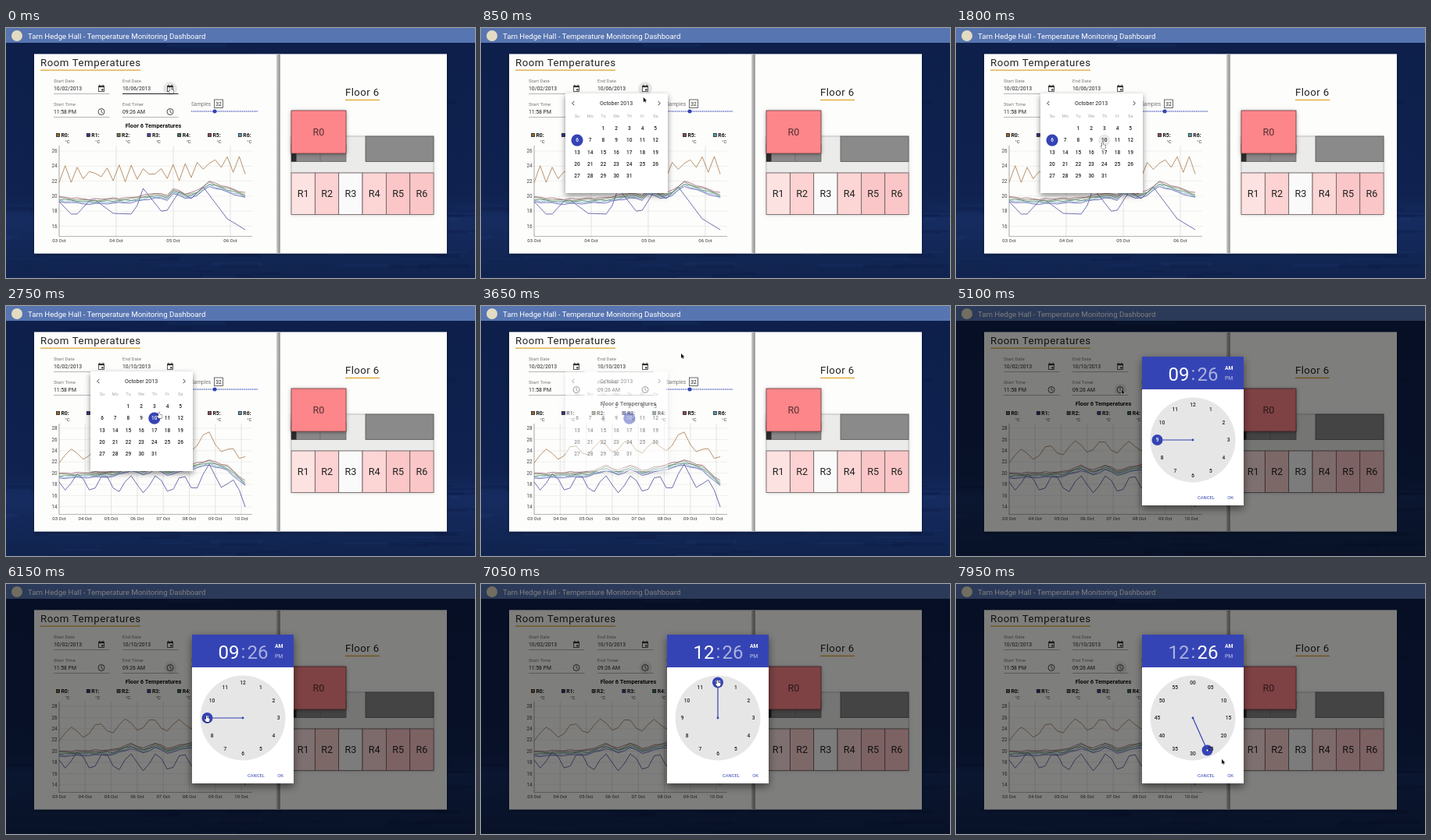
An HTML page with a canvas for the animation above (8000 ms loop, 600 px wide and 321 px high).

```html
<!DOCTYPE html>
<html lang="en">
<head>
<meta charset="utf-8">
<title>Temperature dashboard</title>
<style>
html, body { margin: 0; width: 100%; height: 100%; overflow: hidden; background: #0f2150; }
canvas { display: block; width: 100vw; height: 100vh; }
</style>
</head>
<body>
<canvas id="stage"></canvas>
<script>
const W = 600, H = 321, LOOP = 8000;
const canvas = document.getElementById('stage');
const ctx = canvas.getContext('2d');
const FONT = 'Roboto, "Open Sans", sans-serif';
const BLUE = '#3544b4', GOLD = '#e0aa3a', INK = '#222';

const clamp = v => Math.max(0, Math.min(1, v));
const ramp = (t, a, b) => clamp((t - a) / (b - a));
const ease = v => v * v * (3 - 2 * v);
const mix = (a, b, k) => a + (b - a) * k;

function text(s, x, y, size, color = INK, o = {}) {
  ctx.font = `${o.weight || 400} ${size}px ${FONT}`;
  ctx.letterSpacing = (o.space || 0) + 'px';
  ctx.textAlign = o.align || 'left';
  ctx.textBaseline = o.base || 'alphabetic';
  ctx.fillStyle = color;
  ctx.fillText(s, x, y);
  ctx.letterSpacing = '0px';
}
const centered = (s, x, y, size, color, weight) =>
  text(s, x, y, size, color, { align: 'center', base: 'middle', weight });

function box(x, y, w, h, fill, stroke) {
  ctx.fillStyle = fill;
  ctx.fillRect(x, y, w, h);
  if (stroke) {
    ctx.strokeStyle = stroke;
    ctx.lineWidth = 0.8;
    ctx.strokeRect(x, y, w, h);
  }
}

function line(pts, color, width = 1) {
  ctx.beginPath();
  pts.forEach(([x, y]) => ctx.lineTo(x, y));
  ctx.strokeStyle = color;
  ctx.lineWidth = width;
  ctx.stroke();
}

function disc(x, y, r, fill) {
  ctx.beginPath();
  ctx.arc(x, y, r, 0, 7);
  ctx.fillStyle = fill;
  ctx.fill();
}

// A raised box; the shadow stays outside so the box can fade cleanly.
function card(x, y, w, h, fill, blur, dy, alpha) {
  const k = canvas.width / W;
  ctx.save();
  ctx.beginPath();
  ctx.rect(0, 0, W, H);
  ctx.rect(x, y, w, h);
  ctx.clip('evenodd');
  ctx.shadowColor = `rgba(0,0,0,${alpha})`;
  ctx.shadowBlur = blur * k;
  ctx.shadowOffsetY = dy * k;
  box(x, y, w, h, fill);
  ctx.restore();
  box(x, y, w, h, fill);
}

function random(seed) {
  return () => (seed = (seed * 16807) % 2147483647) / 2147483647;
}

// Linear value through [position, value] knots
function along(knots, p) {
  const i = Math.max(1, knots.findIndex(k => k[0] >= p));
  const [a, va] = knots[i - 1], [b, vb] = knots[i];
  return mix(va, vb, ramp(p, a, b));
}

// Background and header

function backdrop() {
  const g = ctx.createLinearGradient(0, 19, 0, H);
  g.addColorStop(0, '#0d1f4a');
  g.addColorStop(0.65, '#0f2250');
  g.addColorStop(0.75, '#162c60');
  g.addColorStop(1, '#10234e');
  box(0, 0, W, H, g);
  const rnd = random(41);
  for (let i = 0; i < 110; i++) {
    const y = i < 45 ? 20 + rnd() * 290 : 228 + rnd() * 93;
    box(rnd() * W - 30, y, 12 + rnd() * 65, 1 + rnd() * 4,
      rnd() < 0.55 ? 'rgba(7,19,52,0.2)' : 'rgba(47,76,133,0.14)');
  }
}

function header() {
  box(0, 0, W, 19, '#5775b1');
  disc(14, 10, 7, '#e3dcc2');
  text('Tarn Hedge Hall - Temperature Monitoring Dashboard', 28, 13.6, 9.6, '#fff');
}

// Form

function calendarIcon(x, y) {
  box(x - 3.5, y - 3, 7, 7, '#fff', '#333');
  box(x - 3.5, y - 3.5, 7, 2.2, '#333');
  box(x - 2.6, y - 4.8, 1, 2, '#333');
  box(x + 1.6, y - 4.8, 1, 2, '#333');
  box(x + 0.2, y + 0.7, 2.2, 2.2, '#333');
}

function clockIcon(x, y) {
  ctx.beginPath();
  ctx.arc(x, y, 4, 0, 7);
  ctx.strokeStyle = '#333';
  ctx.lineWidth = 0.9;
  ctx.stroke();
  line([[x, y - 2.6], [x, y + 0.3], [x + 2, y + 1.5]], '#333', 0.8);
}

function field(x, y, label, value, icon, active) {
  text(label, x, y, 6, '#777');
  text(value, x, y + 10.2, 6.8, '#222');
  line([[x, y + 14.5], [x + 71.5, y + 14.5]], active ? '#222' : '#999', active ? 1.2 : 0.7);
  icon(x + 61, y + 7.5);
}

function form(t) {
  text('Room Temperatures', 44, 49, 13.2, INK, { space: 0.55 });
  box(44, 53.5, 128, 1.3, GOLD);
  if (t < 900) disc(210, 78, 9, 'rgba(0,0,0,0.09)');
  if (t > 4400) disc(210.5, 107.5, 8, 'rgba(0,0,0,0.08)');
  field(61, 70, 'Start Date', '10/02/2013', calendarIcon);
  field(149, 70, 'End Date', t < PICK ? '10/06/2013' : '10/10/2013', calendarIcon, t < 400);
  field(61, 100, 'Start Time', '11:58 PM', clockIcon);
  field(149, 100, 'End Timer', '09:26 AM', clockIcon, t > 4450 && t < 4900);
  text('Samples', 237, 100, 6.5, '#777');
  box(266.5, 92, 11, 10.5, '#fff', '#444');
  centered('32', 272, 97.7, 6.6, INK);
  line([[237, 107], [322, 107]], '#aab2e0', 1);
  ctx.setLineDash([1, 1.7]);
  line([[237, 107], [322, 107]], '#3f51b5', 1.2);
  ctx.setLineDash([]);
  disc(267, 107, 2.5, BLUE);
}

// Chart: each curve is a trend plus a regular wave over 32 samples

const SAMPLES = 32;
const COLORS = ['#98682f', '#34348c', '#6b8052', '#4a44a8', '#3a7058', '#8c4a5c', '#5a9db8'];

const curve = (trend, swing = 0, period = 1, peak = 0) => i =>
  along(trend, i) - swing * Math.cos(2 * Math.PI * (i - peak) / period);

const SHORT = {
  top: 158, step: 19.3, first: 26, rows: 6, day: 73, days: 4,
  warm: curve([[0, 188], [21, 185], [26, 172], [31, 177]], 11, 2.23, 1),
  cold: curve([[0, 223], [2.5, 243], [5.5, 218], [9, 238], [12.5, 239], [14, 206],
    [17.5, 240], [20, 210], [22, 219], [24, 204], [28, 245], [31, 259]]),
  mid: curve([[0, 220], [5, 223], [12, 221], [16, 215], [18, 218], [19, 209],
    [21, 216], [23, 212], [25, 200], [31, 215]])
};
const LONG = {
  top: 157, step: 14.4, first: 28, rows: 8, day: 33.3, days: 8,
  warm: curve([[0, 194], [12, 180], [21, 182], [25, 168], [30, 197], [31, 186]], 8, 4.5, 2),
  cold: curve([[0, 225], [12, 229], [22, 228], [25, 214], [28, 226], [31, 249]], 11, 4.34, 3.2),
  mid: curve([[0, 218], [9, 216], [12, 208], [14, 214], [16, 207], [18, 214],
    [25, 201], [28, 208], [31, 228]])
};

function series(data, k) {
  const gap = (k % 3 - 1) * 2.6 + (k - 4) * 0.5;
  const value = i => k === 0 ? data.warm(i) : k === 1 ? data.cold(i)
    : data.mid(i) - gap + 0.8 * Math.sin(i * (1.1 + k * 0.23) + k * 2);
  return Array.from({ length: SAMPLES }, (_, i) => [68 + i * 7.68, value(i)]);
}

function chart(data) {
  text('Floor 6 Temperatures', 188.5, 127.5, 7.4, '#111', { align: 'center', weight: 700 });
  COLORS.forEach((c, k) => {
    const x = 64.5 + k * 38.8;
    box(x, 135.5, 4, 4, c, '#222');
    text(`R${k}:`, x + 6, 140, 6.8, '#111', { weight: 700 });
    text('°C', x + 11, 148, 5.8, '#333');
  });
  for (let i = 0; i < data.rows; i++) {
    const y = data.top + i * data.step;
    line([[68, y], [315, y]], '#e4e4e4', 0.6);
    text(data.first - 2 * i, 65.5, y + 0.3, 6.3, '#444', { align: 'right', base: 'middle' });
  }
  for (let i = 0; i < data.days; i++) {
    const x = 68 + i * data.day;
    line([[x, 151], [x, 269]], '#d3d3d3', 0.6);
    centered(String(3 + i).padStart(2, '0') + ' Oct', x, 273.7, 6, '#333');
  }
  line([[68, 151], [68, 267.5], [315, 267.5]], '#999', 0.7);
  COLORS.forEach((c, k) => line(series(data, k), c, 0.7));
}

// Floor plan

function floorPlan() {
  text('Floor 6', 434, 87, 13.2, INK, { space: 0.4 });
  box(434, 91.7, 44, 1.4, GOLD);
  card(365, 139, 182, 100, '#ebebea', 4, 1, 0.2);
  box(365, 139, 182, 47, '#ebebea', '#b5b5b5');
  box(365, 150, 70, 21.5, '#8a8888', '#666');
  box(365, 160, 6.5, 11.5, '#2c2a2c');
  line([[402, 161], [402, 171]], '#666', 0.7);
  box(460, 139, 87, 32.5, '#8b8a8a', '#555');
  card(365, 106, 70, 55, '#fd868a', 5, 1, 0.4);
  box(365, 106, 70, 55, '#fd868a', '#6e3d40');
  centered('R0', 400, 134.5, 12.6, '#5a2e31');
  ['#fde2e2', '#fcd2d2', '#fafafa', '#fcd5d5', '#fbc6c7', '#fbc6c7'].forEach((c, i) => {
    const x = 365 + i * 30.35;
    box(x, 186, 30.35, 53.5, c, '#665a5a');
    centered('R' + (i + 1), x + 15.2, 213.5, 12.6, INK);
  });
}

function page(t) {
  backdrop();
  card(36, 33.5, 528, 256, '#fdfdfc', 4, 1, 0.35);
  const g = ctx.createLinearGradient(345.5, 0, 351, 0);
  g.addColorStop(0, '#d8d8d8');
  g.addColorStop(1, '#858585');
  box(346, 33.5, 4.7, 256, g);
  header();
  form(t);
  chart(t < RELOAD ? SHORT : LONG);
  floorPlan();
}

// Date popup

const PICK = 2350, RELOAD = 2650;

function datePopup(t) {
  const alpha = t < 3000 ? ramp(t, 400, 650) : 1 - ramp(t, 3550, 3740);
  if (alpha <= 0) return;
  ctx.save();
  ctx.globalAlpha = alpha;
  card(108, 84, 131, 128, '#fff', 7, 3, 0.45 * alpha);
  for (const s of [-1, 1]) {
    const x = 173 + s * 55;
    line([[x - s * 1.3, 94], [x + s * 1.2, 96.6], [x - s * 1.3, 99.2]], '#333', 1);
  }
  centered('October 2013', 173, 97, 7, INK);
  const colX = c => 123 + c * 16.7;
  ['Su', 'Mo', 'Tu', 'We', 'Th', 'Fr', 'Sa'].forEach((d, c) =>
    centered(d, colX(c), 113.5, 5.8, '#aaa'));
  const chosen = t < PICK ? 6 : 10;
  for (let d = 1; d <= 31; d++) {
    const x = colX((d + 1) % 7), y = 129 + Math.floor((d + 1) / 7) * 15.1;
    if (d === chosen) disc(x, y, 7.6, BLUE);
    else if (d === 10 && t > 1450) disc(x, y, 7.6, '#e9e9e9');
    centered(d, x, y + 0.4, 6.5, d === chosen ? '#fff' : INK, 500);
  }
  ctx.restore();
}

// Time dialog

const DRAG = 6400, DROP = 7000, MINUTES = 7100;
const CX = 303, CY = 172, REACH = 45.5;

function polar(turn) {
  const a = turn * Math.PI * 2;
  return [CX + REACH * Math.sin(a), CY - REACH * Math.cos(a)];
}

const dragTurn = t => mix(0.75, 1, ease(ramp(t, DRAG, DROP)));

function dial(alpha, turn, minutes) {
  if (alpha <= 0) return;
  ctx.save();
  ctx.globalAlpha *= alpha;
  const [x, y] = polar(turn);
  line([[CX, CY], [x, y]], BLUE, 1.2);
  disc(CX, CY, 1.4, BLUE);
  disc(x, y, 7, BLUE);
  for (let i = 0; i < 12; i++) {
    const s = minutes ? String(i * 5).padStart(2, '0') : i || 12;
    const on = !minutes && Math.round(turn * 12) % 12 === i;
    const [nx, ny] = polar(i / 12);
    centered(s, nx, ny + 0.4, 6.6, on ? '#fff' : INK, 500);
  }
  if (minutes) disc(x, y, 1.1, '#fff');
  ctx.restore();
}

function timeDialog(t) {
  const alpha = ramp(t, 4850, 5080);
  if (alpha <= 0) return;
  const hour = Math.round(dragTurn(t) * 12);
  const swap = ramp(t, MINUTES, MINUTES + 200);
  const dim = 'rgba(255,255,255,0.58)';
  ctx.save();
  ctx.globalAlpha = alpha;
  box(0, 0, W, H, 'rgba(0,0,0,0.5)');
  card(238, 65, 130, 191, '#fff', 10, 4, 0.5);
  box(238, 65, 130, 42, BLUE);
  text(String(hour).padStart(2, '0'), 298.5, 96, 24, swap ? dim : '#fff', { align: 'right' });
  text(':', 303.5, 94.5, 24, dim, { align: 'center' });
  text('26', 308.5, 96, 24, swap ? '#fff' : dim);
  text('AM', 344, 81.7, 6.8, '#fff', { weight: 700 });
  text('PM', 344, 94.7, 6.8, dim, { weight: 500 });
  disc(CX, CY, 54.5, '#e7e6e6');
  dial(1 - swap, hour / 12, false);
  dial(swap, 26 / 60, true);
  centered('CANCEL', 320, 246, 5.8, BLUE);
  centered('OK', 351, 246, 5.8, BLUE);
  ctx.restore();
}

// Pointer: start, end, target of each move

const MOVES = [
  [650, 1500, 188, 150], [2600, 3300, 256, 61], [3800, 4450, 212, 107],
  [5250, 5950, 257, 172], [7250, 7850, 340, 225]
];

function pointerAt(t) {
  let x = 211, y = 79;
  for (const [start, end, tx, ty] of MOVES) {
    if (t > DRAG && start > DRAG) [x, y] = polar(dragTurn(t));
    const k = ease(ramp(t, start, end));
    x = mix(x, tx, k);
    y = mix(y, ty, k);
  }
  return [x, y];
}

function outline(points, fill, stroke) {
  ctx.beginPath();
  points.forEach(([x, y]) => ctx.lineTo(x, y));
  ctx.closePath();
  ctx.fillStyle = fill;
  ctx.strokeStyle = stroke;
  ctx.lineWidth = 0.8;
  ctx.stroke();
  ctx.fill();
}

const HAND = [[-1, -3], [0.3, -3], [0.5, 0], [3.5, 0.7], [3.5, 3], [2.6, 5],
  [-0.8, 5], [-3, 2], [-2.4, 1.2], [-1, 2]];
const ARROW = [[0, 0], [0, 6], [1.4, 4.8], [2.4, 6.8], [3.3, 6.3], [2.4, 4.4], [4.2, 4.2]];

function pointer(t) {
  const hand = t < 850 || (t > 1250 && t < 2850) || (t > 5850 && t < 7400);
  ctx.save();
  ctx.translate(...pointerAt(t));
  if (hand) outline(HAND, '#fff', '#111');
  else outline(ARROW, '#111', '#eee');
  ctx.restore();
}

function frame(now) {
  const t = now % LOOP;
  const dpr = window.devicePixelRatio || 1;
  const w = Math.round(innerWidth * dpr), h = Math.round(innerHeight * dpr);
  if (canvas.width !== w || canvas.height !== h) {
    canvas.width = w;
    canvas.height = h;
  }
  ctx.setTransform(w / W, 0, 0, h / H, 0, 0);
  page(t);
  datePopup(t);
  timeDialog(t);
  pointer(t);
  requestAnimationFrame(frame);
}
requestAnimationFrame(frame);
</script>
</body>
</html>
```
